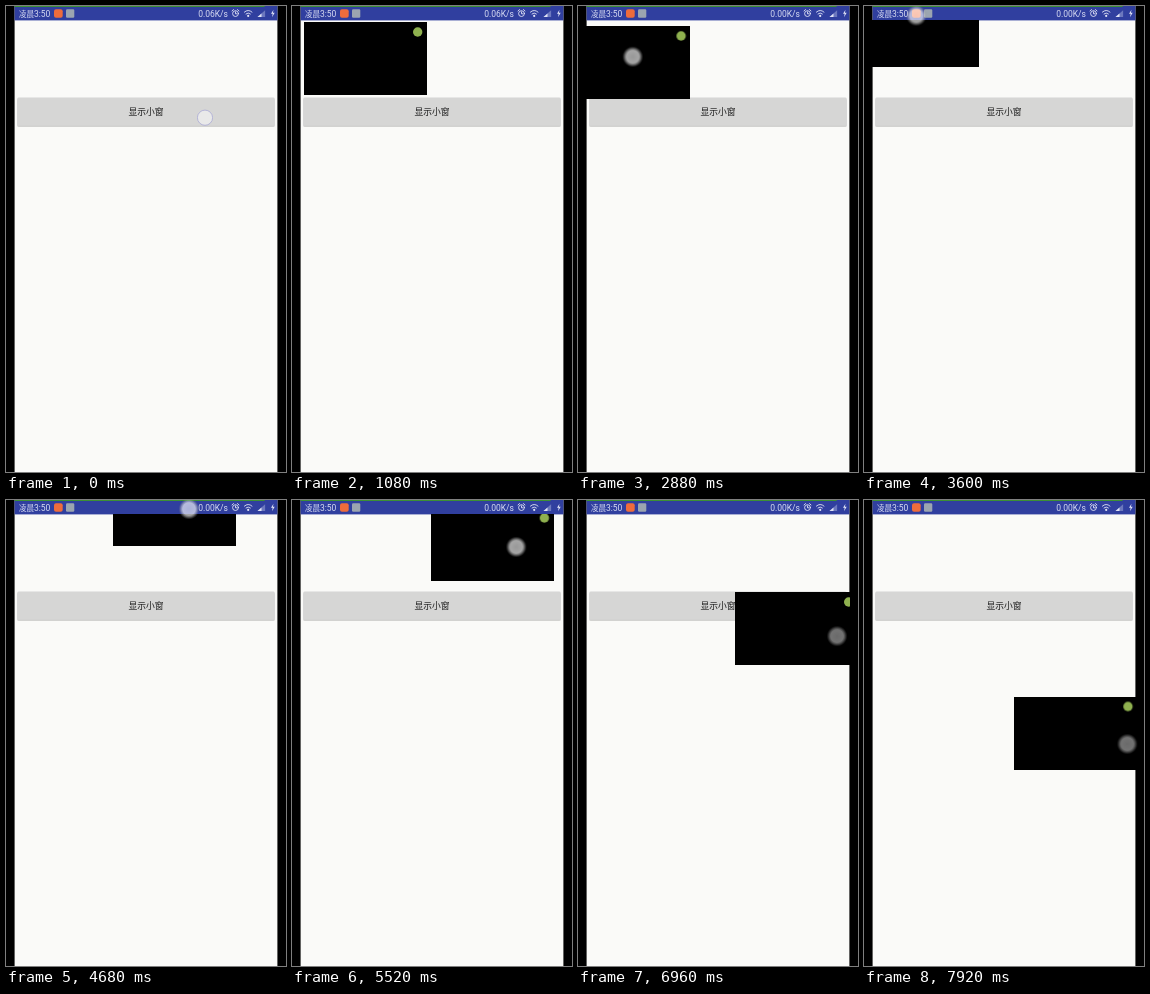
Recreate the animation shown at these times as an HTML page. Size 280 px wide and 466 px high, loop 8 s.

```html
<!DOCTYPE html>
<html lang="zh">
<head>
<meta charset="utf-8">
<title>Floating window</title>
<style>
  html, body { margin: 0; width: 100%; height: 100%; overflow: hidden; background: #000; }
  svg { display: block; width: 280px; height: 466px; }
  text { font-family: Roboto, "Noto Sans CJK SC", "Noto Sans CJK", sans-serif; }
  .bar text { font-size: 8.5px; fill: #d9ddf3; }
  .bar .cjk { font-size: 7.6px; }
  .label { font-size: 8.8px; fill: #1c1c1c; text-anchor: middle; }
  .line { fill: none; stroke: #e2e5f6; stroke-width: .9; stroke-linecap: round; }

  .drag, .grip, .window, .finger, .tap { animation: 8s linear infinite; }
  .drag { animation-name: drag; animation-timing-function: ease-in-out; }
  .grip { animation-name: grip; }
  .window { animation-name: open; animation-timing-function: step-end; }
  .finger { animation-name: press; animation-timing-function: step-end; }
  .tap { animation-name: tap; }

  @keyframes drag {
    0%, 22.5% { transform: translate(12px, 16px); }
    25.5% { transform: translate(-25px, -5.4px); }
    30% { transform: translate(-12px, 36px); }
    45% { transform: translate(-7.7px, -12.4px); }
    51% { transform: translate(10px, 34px); }
    58.5% { transform: translate(107px, -27px); }
    73.5%, 79.5% { transform: translate(146px, 16px); }
    87% { transform: translate(157px, 92px); }
    99%, 100% { transform: translate(150.3px, 196.5px); }
  }
  @keyframes grip {
    0%, 25.5% { transform: translate(71.5px, 41px); }
    45% { transform: translate(60px, 22px); }
    58.5% { transform: translate(76px, 36px); }
    99%, 100% { transform: translate(113px, 47.5px); }
  }
  @keyframes open {
    0% { visibility: hidden; }
    2.9%, 100% { visibility: visible; }
  }
  @keyframes press {
    0%, 73.5% { opacity: 0; }
    22.4% { opacity: 1; }
    79.4%, 100% { opacity: .7; }
  }
  @keyframes tap {
    0% { opacity: 1; }
    4.5%, 100% { opacity: 0; }
  }
</style>
</head>
<body>
<svg viewBox="0 0 280 466">
  <defs>
    <clipPath id="content"><rect x="8.6" y="14.4" width="262.8" height="452"/></clipPath>
    <radialGradient id="glow">
      <stop offset="0" stop-color="#fff" stop-opacity=".6"/>
      <stop offset=".6" stop-color="#fff" stop-opacity=".65"/>
      <stop offset=".76" stop-color="#ccc" stop-opacity=".5"/>
      <stop offset="1" stop-color="#888" stop-opacity="0"/>
    </radialGradient>
  </defs>
  <rect width="280" height="466"/>
  <rect x="8.6" width="262.8" height="466" fill="#fafaf8"/>

  <g class="bar">
    <rect x="8.6" width="262.8" height="14.4" fill="#303f9f"/>
    <rect x="8.6" width="250" height="1" fill="#3c8f35"/>
    <text class="cjk" x="13" y="10.7">凌晨</text>
    <text x="28" y="10.7">3:50</text>
    <rect x="48" y="3.2" width="8.7" height="8.6" rx="2" fill="#ee6c3c"/>
    <rect x="60" y="3.2" width="8.3" height="8.6" rx="1.2" fill="#9ba5b0"/>
    <text id="speed" x="192.2" y="10.7">0.06K/s</text>
    <g class="line">
      <circle cx="229.5" cy="7.6" r="2.9"/>
      <path d="M229.5 5.9v1.9h1.2M226 4.9l1.5-1.3M233 4.9l-1.5-1.3"/>
      <path d="M238.4 6.1q3.8-3.4 7.6 0M240 7.9q2.2-1.9 4.4 0"/>
    </g>
    <circle cx="242.2" cy="9.9" r="1.1" fill="#e2e5f6"/>
    <path d="M251.5 11h7.6V4.2z" fill="#6c78be"/>
    <path d="M251.5 11h4V7.4z" fill="#dfe2f5"/>
    <path d="M267.5 3.8l-2.5 4h1.7l-.7 3.4 2.7-4.4h-1.8z" fill="#e2e5f6"/>
  </g>

  <rect x="11.2" y="92.5" width="257.6" height="28.6" rx="1.5" fill="#000" opacity=".16"/>
  <rect x="11.4" y="91.4" width="257.2" height="28.2" rx="1.2" fill="#d6d6d5"/>
  <text class="label" x="140" y="109.2">显示小窗</text>

  <g clip-path="url(#content)">
    <g class="drag">
      <g class="window">
        <rect width="123" height="73"/>
        <circle cx="113.7" cy="10" r="4.7" fill="#8fb14f"/>
      </g>
    </g>
  </g>

  <g class="drag">
    <g class="grip">
      <circle class="finger" r="10.5" fill="url(#glow)"/>
    </g>
  </g>
  <circle class="tap" cx="199" cy="111.7" r="7.6" fill="#e9e9e9" stroke="#a9a9d4" stroke-width=".8"/>
</svg>
<script>
const LOOP = 8000, STEP = 120, SPEED_DROP = 2760;
const speed = document.getElementById('speed');
const animations = document.getAnimations();
animations.forEach(animation => animation.pause());

function draw(elapsed) {
  const time = Math.floor(elapsed % LOOP / STEP) * STEP;
  animations.forEach(animation => { animation.currentTime = time; });
  speed.textContent = time < SPEED_DROP ? '0.06K/s' : '0.00K/s';
}

const start = performance.now();
function tick() {
  draw(performance.now() - start);
  requestAnimationFrame(tick);
}
tick();
</script>
</body>
</html>
```
